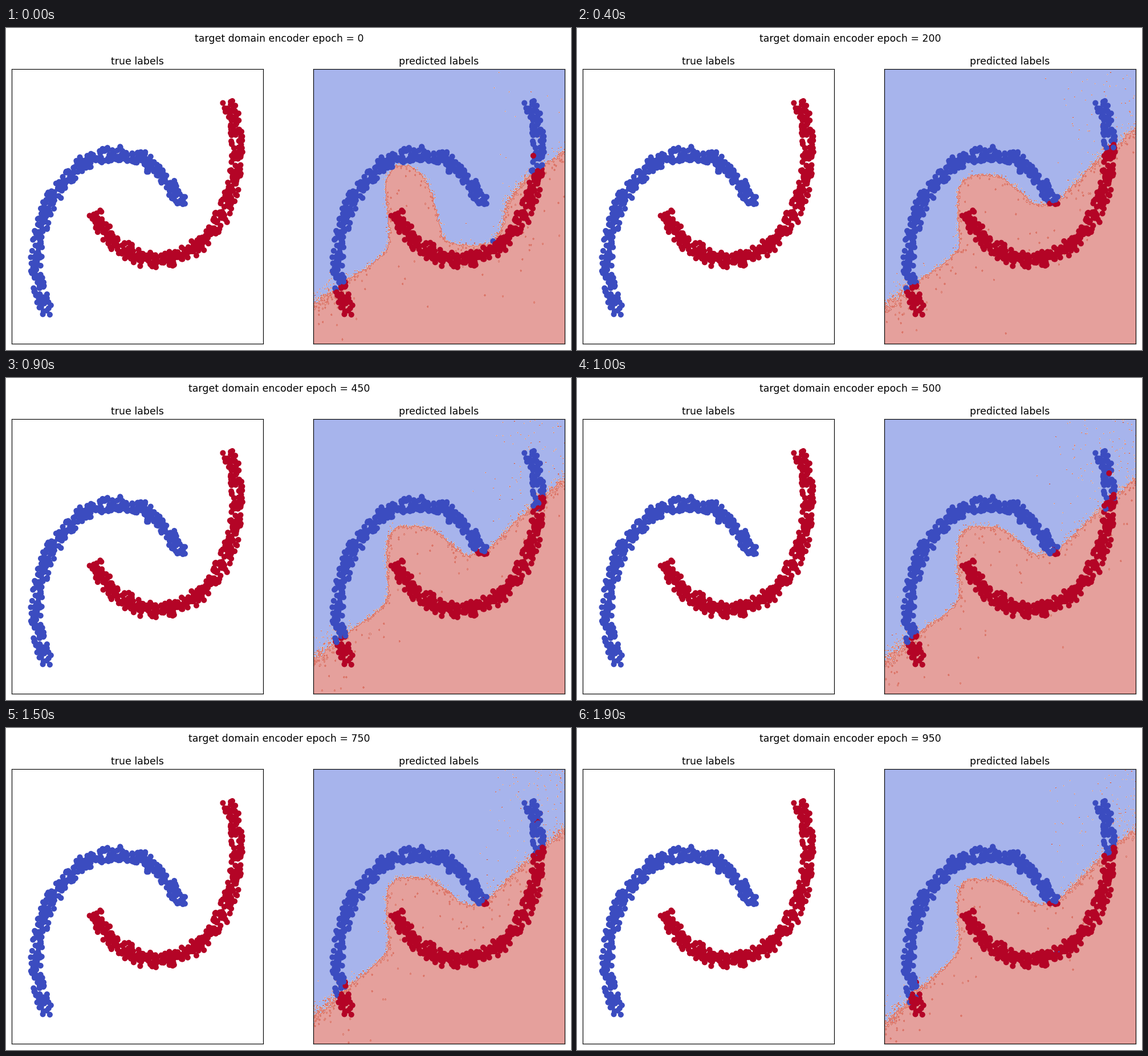
Recreate the animation shown at these times as a matplotlib script. Size 991x565 px, loop 2000 ms.

```python
import numpy as np
import matplotlib.pyplot as plt
from matplotlib.animation import FuncAnimation
from matplotlib.path import Path

W, H, DPI = 991, 565, 100
FRAMES, INTERVAL, EPOCH_STEP = 20, 100, 50
LAST_EPOCH = (FRAMES - 1) * EPOCH_STEP
LEFT, TOP, PANEL_W, PANEL_H, SHIFT = 10.35, 72.45, 440.7, 481.25, 528.9
FONT_SIZE = 12.5
COLORS = np.array(["#3b4cc0", "#b40426"])
LEVELS = np.arange(8) * 0.15

plt.rcParams["font.family"] = "DejaVu Sans"
plt.rcParams["axes.linewidth"] = 0.83

# Key points of the decision boundary, in stage pixels
FOOT = [(530, 491), (605, 438), (645, 412), (672, 385)]
FIRST_HILL = [(671, 340), (663, 268), (685, 236), (720, 246), (746, 280), (757, 335),
              (773, 379), (846, 382), (869, 355), (876, 306), (915, 260), (990, 207)]
SETTLED_HILL = [(667, 325), (667, 281), (684, 257), (715, 255), (746, 258), (776, 284),
                (802, 310), (838, 306), (862, 284), (890, 255), (930, 217), (990, 167)]


def moon(rng, center, sign, n=400):
    """Half an ellipse with uniform jitter."""
    t = np.linspace(0, np.pi, n)[:, None]
    arc = np.cos(t) * (118, -94) + np.sin(t) * (-63, -155)
    return center + sign * arc + rng.uniform(-1, 1, (n, 2)) * (10, 12.5)


def smooth(points, n=170, k=9):
    s = np.linspace(0, len(points) - 1, n)
    cols = []
    for col in points.T:
        dense = np.interp(s, np.arange(len(points)), col)
        cols.append(np.convolve(np.pad(dense, k // 2, mode="edge"), np.ones(k) / k, "valid"))
    return np.column_stack(cols)


def boundary(epoch):
    settle = 1 - max(0, 1 - epoch / 200) ** 2
    hill = (1 - settle) * np.array(FIRST_HILL) + settle * np.array(SETTLED_HILL)
    curve = smooth(np.vstack([FOOT, hill]))
    x, p = curve[:, 0], epoch / LAST_EPOCH
    curve[:, 1] += 9 * p * np.exp(-((x - 720) / 60) ** 2)
    curve[:, 1] += 36 * p ** 2 * np.clip((670 - x) / 140, 0, 1)
    return curve


def predict(x, y, curve, epoch, rng, stray=1.0):
    """Class 0 or 1 per point, uncertain near the boundary."""
    area = Path(np.vstack([curve, [(990, 600), (530, 600)]]))
    red = area.contains_points(np.column_stack([x, y]))
    d2 = np.full(x.shape, 1e9)
    for px, py in curve:
        d2 = np.minimum(d2, (x - px) ** 2 + (y - py) ** 2)
    d = np.sqrt(d2)

    west = np.clip((625 - x) / 60, 0, 1)
    east = np.clip((x - 800) / 180, 0, 1)
    early = max(0, 1 - epoch / 200)
    late = min(1, 0.2 + epoch / 400)
    width = 2 + 4 * west + 2.5 * east
    red_tail = (0.007 + 0.015 * early * east + 0.008 * west) * np.exp(-d / 34)
    blue_tail = 0.022 * late * east ** 1.5 + 0.03 * west * np.exp(-d / 14)
    flip = 0.5 * np.exp(-d / width) + stray * np.where(red, red_tail, blue_tail)
    return red ^ (rng.random(x.shape) < flip)


rng = np.random.default_rng(4)
dots = np.vstack([moon(rng, (187, 402), 1), moon(rng, (272, 227), -1)])
labels = np.repeat([0, 1], len(dots) // 2)
order = rng.permutation(len(dots))
dots, labels = dots[order], labels[order]
pred_x, pred_y = dots[:, 0] + SHIFT, dots[:, 1]

gx, gy = np.meshgrid(np.linspace(LEFT + SHIFT, LEFT + SHIFT + PANEL_W, 322),
                     np.linspace(TOP, TOP + PANEL_H, 268))

fig = plt.figure(figsize=(W / DPI, H / DPI), dpi=DPI, facecolor="white")


def panel(x0, title):
    ax = fig.add_axes([x0 / W, 1 - (TOP + PANEL_H) / H, PANEL_W / W, PANEL_H / H])
    ax.set(xlim=(x0, x0 + PANEL_W), ylim=(TOP + PANEL_H, TOP), xticks=[], yticks=[])
    ax.set_title(title, fontsize=FONT_SIZE)
    return ax


true_ax = panel(LEFT, "true labels")
pred_ax = panel(LEFT + SHIFT, "predicted labels")
true_ax.scatter(*dots.T, s=39, c=COLORS[labels])
pred_dots = pred_ax.scatter(pred_x, pred_y, s=39, c=COLORS[labels], zorder=2)
heading = fig.text(479.6 / W, 1 - 10 / H, "", ha="center", va="top", fontsize=FONT_SIZE)
regions = []


def update(i):
    epoch = i * EPOCH_STEP
    noise = np.random.default_rng(100 + i)
    curve = boundary(epoch)
    while regions:
        regions.pop().remove()
    grid = predict(gx.ravel(), gy.ravel(), curve, epoch, noise).reshape(gx.shape)
    regions.append(pred_ax.contourf(gx, gy, grid.astype(float), levels=LEVELS,
                                    cmap="coolwarm", alpha=0.5, zorder=1))
    guess = predict(pred_x, pred_y, curve, epoch, noise, stray=0.2).astype(int)
    pred_dots.set_color(COLORS[guess])
    heading.set_text(f"target domain encoder epoch = {epoch}")
    return [pred_dots, heading]


anim = FuncAnimation(fig, update, frames=FRAMES, interval=INTERVAL,
                     init_func=lambda: update(0), repeat=True, repeat_delay=0, blit=False)
plt.show()
```
